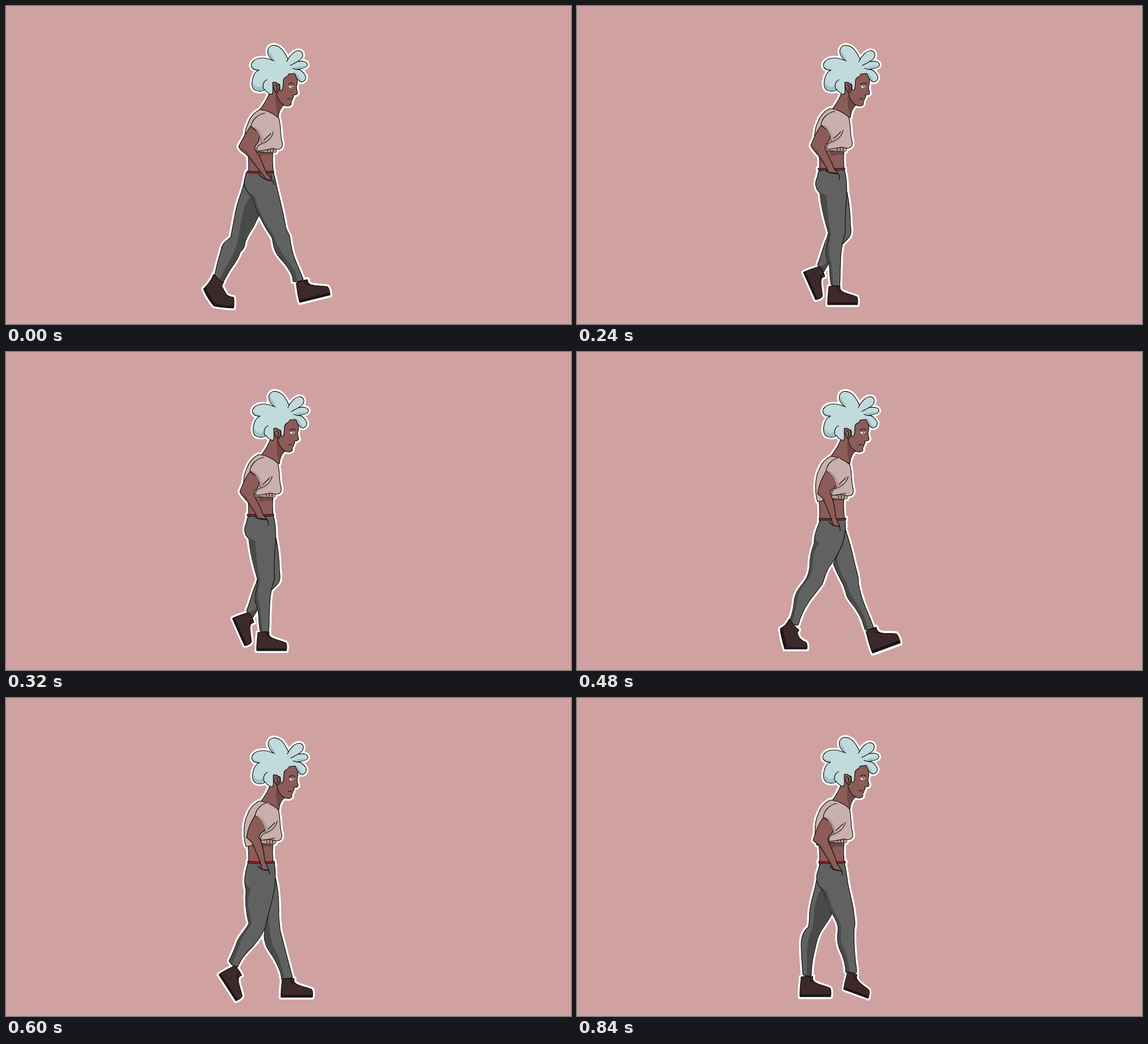
Write an HTML page without scripts that moves like this. It is 998 by 561 pixels and loops after 960 ms.

```html
<!DOCTYPE html>
<html lang="en">
<head>
<meta charset="utf-8">
<title>Walk cycle</title>
<style>
  html, body { margin: 0; width: 100%; height: 100%; overflow: hidden; background: #cfa1a0; }
  svg { display: block; width: 100vw; height: 100vh; }
  path { stroke: var(--ink, #0d0a0a); stroke-width: var(--w, 1.15px); stroke-linejoin: round; stroke-linecap: round; }
  .halo { --ink: #fff; --w: 8px; }
  .hair { fill: #c1dadb; }
  .skin { fill: #8b5c58; }
  .shirt { fill: #c9b0ac; }
  .pants { fill: #616161; }
  .boot { fill: #3d282a; }
  .line { fill: none; }
  .shade { stroke: none; }
  .hair.shade { fill: #9cc3c7; }
  .skin.shade { fill: #6f4846; }
  .shirt.shade { fill: #b39a97; }
  .pants.shade { fill: #494949; }
  .boot.shade { fill: #1d1517; }
  .belt { fill: #9b2b2d; }
  .pose { visibility: hidden; animation: show 960ms step-end calc(var(--i) * 120ms - 960ms) infinite; }
  @keyframes show {
    0% { visibility: visible; }
    12.5%, 100% { visibility: hidden; }
  }
</style>
</head>
<body>
<svg viewBox="0 0 998 561">
<defs>
  <g id="head">
    <path class="skin" d="M466 150C463 163 456 172 447 185L481 197C481 187 485 181 490 175C496 177 502 177 504 173C503 169 504 167 506 165C505 163 508 162 508 160L507 157C511 157 515 156 515 153C513 148 512 144 514 139C515 132 515 124 512 117L489 115Z"/>
    <path class="skin shade" d="M477 152C479 163 484 170 490 174C485 181 482 186 480 193C476 182 475 165 477 152Z"/>
    <path class="line" d="M478 156C480 165 485 171 491 175M497 164L503 163"/>
    <path class="hair" d="M474 97C466 93 460 84 463 76C466 68 475 68 482 72C489 76 494 85 498 94C503 86 508 80 515 79C523 78 526 85 523 91C520 95 517 97 515 98C520 97 523 97 527 98C533 100 534 105 529 108C525 110 520 111 513 112C520 111 525 116 529 123C531 130 526 134 521 134C516 132 512 125 510 119L499 120C499 126 491 124 490 131C489 140 490 146 487 149L484 148C484 142 484 139 483 138L472 135C470 141 473 150 470 156C464 155 460 152 457 147C454 151 447 151 441 149C434 146 433 137 436 127C438 119 442 115 447 113C437 114 431 108 434 101C438 93 447 91 458 92C464 93 468 95 474 97Z"/>
    <path class="hair shade" d="M435.500 132C434 144 440 149 449 149C454 149 456 145 455 138C450 146 440 145 435.500 132ZM511 118C514 129 518 133 523 133C519 129 517 121 511 118ZM507 110C516 111 526 111 531 106C524 107 516 105 507 110ZM474 97C466 92 462 83 464 76C467 86 473 88 474 97ZM435 104C435 111 441 113 448 111C441 110 437 109 435 104Z"/>
    <path class="line" d="M456 148C452 142 454 133 461 130M498 94L496 98M515 98L502 105M513 112L506 110"/>
    <path class="skin" d="M483 140C479 135 474 133 471 135C471 141 474 149 478 154C482 151 484 145 483 140Z"/>
    <path class="line" d="M475 139C480 140 480 145 478 150"/>
    <path class="shade" d="M499 141L508 141L505 145L501 144Z" fill="#efe6e4"/>
    <path class="line" d="M499 138C503 135 507 135 509 138M504.500 141.500L505 144"/>
  </g>

  <g id="belly">
    <path class="skin" d="M427 256C428 268 430 280 428 298L473 298C471 284 470 268 472 254Z"/>
    <path class="skin shade" d="M446 256L471 256L470 263Q459 260 449 265Z"/>
  </g>
  <path id="belt" class="belt" d="M426 -1Q450 1 473 -1V2Q450 4 426 2Z"/>

  <g id="shirt">
    <path class="shirt" d="M447 181C456 181 470 186 481 196C485 210 483 222 486 235C489 245 487 251 477 251L476 256C465 257 454 256 446 255L430 260L424 261C420 250 418 222 426 206C430 194 437 186 447 181Z"/>
    <path class="shirt shade" d="M446 251Q460 247 477 251L476 256Q461 257 447 254Z"/>
    <path class="line" d="M456 250Q466 247 477 251M461 251V255M466 250V255M471 250V255"/>
  </g>
  <g id="sleeve">
    <path class="shirt" d="M455 186C443 188 432 198 431 210C441 213 448 225 449 238L466 222"/>
    <path class="shirt shade" d="M432 210C441 208 450 220 454 235L449 238C448 226 441 214 432 210Z"/>
    <path class="shirt" d="M470 219C468 230 461 236 449 240C442 243 440 248 441 253Q453 252 466 249"/>
    <path class="shirt shade" d="M469 224C467 231 460 237 449 241L444 244Q463 241 469 224Z"/>
  </g>

  <!-- heel at the origin, toe to the right -->
  <g id="boot">
    <path class="boot" d="M2 -32C9 -34 16 -34 23 -33C22 -29 23 -26 26 -24C34 -19 45 -18 54 -14C56 -11 56 -5 55 0H0C-1 -10 1 -20 2 -32Z"/>
    <path class="boot shade" d="M0 -4H55V0H0Z"/>
    <path class="line" d="M17 -33L19 -26L26 -24"/>
  </g>

  <g id="p0">
    <use href="#belly"/>
    <path class="pants" d="M421 308C419 325 409 342 405 365C402 382 399 396 397 408C390 414 382 418 380 430C376 445 371 460 369 474C372 480 379 486 384 487C386 482 391 474 396 465C403 455 410 446 413 436C416 430 422 428 422 419C424 408 432 397 438 388C441 380 446 372 448 366L433 335Z"/>
    <path class="pants shade" d="M433 335L447 366C443 377 434 391 427 402C422 409 423 419 420 424C412 435 410 446 398 460L384 485L377 482C388 460 400 443 406 426C412 408 414 385 418 367C421 352 427 343 433 335Z"/>
    <path class="pants" d="M424 294H472C476 305 478 318 481 330C487 355 492 375 494 390C496 398 500 402 501 406C503 420 505 435 511 448C517 463 522 474 525 482C520 487 513 487 507 486C507 478 504 471 499 464C493 453 481 444 476 433C472 424 472 417 470 409C462 397 450 378 441 355C438 345 436 340 433 335C426 328 420 320 421 312C421 305 423 300 424 294Z"/>
    <path class="pants shade" d="M424 322Q430 331 440 337C444 362 461 386 474 407C479 428 497 447 510 467L515 486L508 485C505 466 487 449 477 433L471 409C455 386 443 363 438 345Q433 333 424 322Z"/>
    <path class="boot" d="M367 473C362 486 355 493 349 499C352 508 360 520 367 529C378 532 390 532 402 533C403 526 403 519 402 514C395 513 389 510 388 507L381 494L384 488C378 484 372 479 367 473Z"/>
    <path class="boot shade" d="M349 499C352 509 360 521 367 529C378 532 390 532 402 533V529C390 529 378 528 370 525C363 518 357 508 353 496Z"/>
    <use href="#boot" transform="translate(519 523)rotate(-14)scale(1 1.08)"/>
    <use href="#belt" y="292"/>
    <use href="#head"/>
    <use href="#shirt" x="1" y="2"/>
    <path class="skin" d="M432 212C424 224 416 237 411 248C414 256 421 259 425 262L452 296L461 307L470 306C466 301 462 298 460 294C455 283 450 270 446 262C441 256 438 252 441 246C447 241 449 234 447 224Z"/>
    <path class="skin shade" d="M412 249L425 256L458 301L451 294L425 261Z"/>
    <use href="#sleeve" x="2" y="3"/>
    <path class="line" d="M446 297Q456 307 472 309L473 315M467 296L469 303"/>
  </g>

  <g id="p1">
    <use href="#belly"/>
    <path class="pants" d="M422 318C418 340 418 362 422 380C424 392 426 396 424 402C417 408 406 417 402 424C400 440 392 455 386 464C389 470 394 474 399 475C405 464 416 454 428 444C440 435 450 424 452 414L455 406L431 334Z"/>
    <path class="pants shade" d="M431 334L455 406C450 424 438 436 425 446Q409 458 399 474L394 472C403 458 415 448 425 432C432 420 438 412 438 395C437 375 432 350 431 334Z"/>
    <path class="pants" d="M426 291L474 290C479 305 482 325 482 345C483 365 481 385 481 393C483 400 484 402 484 409C487 420 492 435 495 450C500 470 504 485 506 493C500 497 493 496 487 496C486 482 478 467 470 454C461 442 455 432 455 420C457 408 452 402 448 392C441 375 434 352 431 334C425 328 422 321 423 312Z"/>
    <path class="pants shade" d="M425 326Q433 334 440 336C443 360 444 378 458 400C463 412 461 425 470 440Q486 462 491 495L487 495C486 475 473 458 466 447C459 437 455 430 456 418C458 406 449 395 445 382C439 364 434 350 431 334Z"/>
    <use href="#boot" transform="translate(365 486)rotate(57)"/>
    <use href="#boot" x="486" y="528"/>
    <use href="#belt" x="1" y="289"/>
    <use href="#head" x="1" y="1"/>
    <use href="#shirt"/>
    <path class="skin" d="M431 211C423 224 416 236 411 248C415 255 420 258 424 262L444 291L450 302L465 305C462 300 458 296 455 292C452 283 448 270 444 262C438 255 438 249 441 244C448 240 449 232 446 222Z"/>
    <path class="skin shade" d="M412 249L424 256L451 298L444 290L424 261Z"/>
    <use href="#sleeve"/>
    <path class="line" d="M444 294Q452 303 470 306L472 311"/>
  </g>

  <g id="p2">
    <use href="#belly"/>
    <path class="pants" d="M470 305C478 325 482 350 483 385C485 400 484 406 478 411L469 420L446 452L434 472C430 468 427 462 425 456C432 440 434 425 442 408Z"/>
    <path class="pants shade" d="M446 452L434 471L429 462L442 452Z"/>
    <path class="pants" d="M427 291C440 287 458 288 472 289C476 300 477 320 476 340C473 365 474 385 474 400C472 408 469 416 468 425C465 440 466 455 465 465C465 475 465 485 464 493C460 496 454 495 449 492C446 480 447 465 445 455C440 442 438 435 441 424C443 415 446 410 444 400C438 380 431 355 429 330C421 322 420 312 424 303Z"/>
    <path class="pants shade" d="M424 323Q433 332 440 333C443 360 443 380 449 402C443 423 444 433 449 452L453 493L449 491C447 470 447 460 444 451C439 439 440 429 442 422C446 411 445 403 443 396C437 376 431 354 429 330Z"/>
    <use href="#boot" transform="translate(400 470)rotate(66)scale(.96)"/>
    <use href="#boot" transform="translate(443 527)scale(.95 1)"/>
    <use href="#belt" y="287"/>
    <use href="#head" x="2"/>
    <use href="#shirt" x="-1"/>
    <path class="skin" d="M431 211C422 222 418 234 413 246C416 254 421 257 425 262L440 284L444 293L461 295C457 290 455 288 453 285C451 277 446 268 442 260C438 254 437 249 440 244C447 239 449 232 445 221Z"/>
    <path class="skin shade" d="M414 247L425 256L446 291L440 283L425 261Z"/>
    <use href="#sleeve"/>
    <path class="line" d="M440 291Q447 296 461 296Q465 300 463 306"/>
  </g>

  <g id="p3">
    <use href="#belly"/>
    <path class="pants" d="M474 312C480 332 485 350 490 370C492 378 495 385 493 392C491 410 491 425 492 435C494 450 497 460 498 467C492 471 484 470 479 465C480 455 478 445 473 434C467 425 465 412 465 400C464 392 466 372 468 350Z"/>
    <path class="pants shade" d="M468 360C474 390 476 402 483 415Q490 440 493 469L480 466C481 448 474 437 471 429C465 415 464 395 468 360Z"/>
    <path class="pants" d="M428 289L474 288C477 300 474 315 472 330C469 350 466 372 463 398C463 405 458 411 455 415C448 428 441 440 437 452C431 465 429 478 426 490C418 493 410 490 405 486C410 470 414 455 414 440C417 425 422 412 432 398C428 380 424 358 424 338C420 330 419 315 424 303Z"/>
    <path class="pants shade" d="M422 322Q425 331 433 335Q426 344 428 360L434 398C424 414 420 428 419 442L412 489L406 486C414 455 412 428 432 398C427 375 424 358 425 338Z"/>
    <use href="#boot" transform="translate(469 500)rotate(27)skewX(4)scale(.92 1.08)"/>
    <use href="#boot" transform="translate(399 527)scale(.93 1.08)"/>
    <use href="#belt" x="1" y="287"/>
    <use href="#head" x="1"/>
    <use href="#shirt" x="1"/>
    <path class="skin" d="M436 209C428 220 424 234 420 246C424 252 428 257 430 264L446 290L449 300L462 300C460 295 458 291 456 287C455 275 452 268 449 259C444 250 444 246 448 240C455 237 456 228 452 220Z"/>
    <path class="skin shade" d="M421 247L430 257L451 297L446 289L430 263Z"/>
    <use href="#sleeve" x="5" y="-2"/>
    <path class="line" d="M441 294Q449 300 465 301L463 308"/>
  </g>

  <g id="p4">
    <use href="#belly"/>
    <path class="pants" d="M474 313C480 330 486 352 491 375C494 388 498 397 497 407C500 425 505 440 511 454C516 466 521 477 524 487C519 491 513 491 509 490C506 482 504 472 497 460C490 448 481 440 477 431C474 422 473 416 469 408C463 395 456 385 453 373C462 355 470 335 474 313Z"/>
    <path class="pants shade" d="M459 361C461 382 469 396 478 411C481 429 499 449 508 468L515 490L509 489C505 470 488 449 478 431L470 408C464 395 456 385 454 373Z"/>
    <path class="pants" d="M430 296L473 294C476 308 473 322 470 335C465 352 456 365 447 377C439 388 438 398 433 410C426 420 417 430 410 440C402 452 395 465 391 481C386 484 379 480 376 473C381 460 383 448 384 436C386 425 392 417 400 407C408 397 409 390 411 380C411 365 413 352 419 338C418 325 424 310 430 296Z"/>
    <path class="pants shade" d="M420 326Q423 336 429 338Q417 345 416 378C415 399 395 414 390 430Q388 452 380 478L377 473C384 450 382 435 389 422C398 406 411 400 411 380C411 365 413 352 420 338Z"/>
    <path class="boot" d="M375 471C371 480 365 485 359 488C360 500 364 514 367 524H406C407 518 406 514 404 512C396 509 392 505 389 496L392 490C385 486 380 478 375 471Z"/>
    <path class="boot shade" d="M359 488C360 500 364 514 367 524H406V521H371L363 486Z"/>
    <use href="#boot" transform="translate(522 531)rotate(-20)scale(.95 1.22)"/>
    <use href="#belt" x="2" y="294"/>
    <use href="#head" x="1"/>
    <use href="#shirt" x="1" y="3"/>
    <path id="arm" class="skin" d="M441 209C432 222 427 235 425 250C430 255 434 257 436 262L449 293L452 306L464 308C462 300 459 297 457 292C456 280 454 268 451 258C446 250 446 246 452 241C461 237 460 228 456 218Z"/>
    <path class="skin shade" d="M426 250L436 257L454 304L449 292L436 261Z"/>
    <use href="#sleeve" x="9"/>
    <path class="line" d="M445 300Q452 307 464 308L465 315"/>
  </g>

  <g id="p5">
    <use href="#belly"/>
    <path class="pants" d="M474 310C480 330 482 350 482 375C481 390 484 400 484 409C487 420 495 450 506 493C500 497 492 496 487 496C486 482 478 467 470 454C461 442 456 432 456 418L462 370Z"/>
    <path class="pants shade" d="M463 375C464 402 466 420 472 438Q487 463 491 495L487 495C485 475 475 460 468 450C459 437 456 430 457 418Z"/>
    <path class="pants" d="M428 290H474C477 308 476 322 474 338C470 360 463 382 460 396C458 410 448 424 438 436C426 448 416 458 409 475C402 474 397 470 394 464C400 452 405 440 409 428C414 418 424 408 429 398C424 380 422 362 424 338C420 328 421 310 428 290Z"/>
    <path class="pants shade" d="M422 324Q426 333 433 336Q426 347 428 370L434 398C426 412 415 421 413 436L399 470L395 464C404 447 406 425 421 411L429 398C423 375 423 358 425 338Z"/>
    <use href="#boot" transform="translate(376 488)rotate(57)"/>
    <use href="#boot" x="486" y="528"/>
    <use href="#belt" x="1" y="289"/>
    <use href="#head" x="1" y="1"/>
    <use href="#shirt" y="1"/>
    <use href="#arm" y="-4"/>
    <use href="#sleeve" x="9" y="-2"/>
    <path class="line" d="M445 297Q452 304 464 304L466 311"/>
  </g>

  <g id="p6">
    <use href="#belly"/>
    <path class="pants" d="M471 402C468 425 466 445 466 460C466 472 467 480 467 489C461 492 453 491 449 488C450 475 448 455 444 438L458 405Z"/>
    <path class="pants shade" d="M460 421Q452 440 455 460L456 490L450 488C450 468 448 452 446 440Z"/>
    <path class="pants" d="M429 289C445 286 460 287 473 288C475 300 474 330 473 350C471 375 473 390 471 402C466 412 458 421 450 434C440 448 432 462 426 476C421 478 413 471 411 463C419 450 427 435 428 420C430 410 436 402 440 394C437 375 427 355 426 334C420 322 421 305 429 289Z"/>
    <path class="pants shade" d="M424 323Q429 332 438 333Q430 338 433 352L445 394C440 403 434 411 433 424Q429 442 417 469L412 463C423 446 426 432 429 417L440 394C436 375 428 355 427 334Z"/>
    <use href="#boot" transform="translate(389 461)rotate(87)scale(.97 .9)"/>
    <use href="#boot" transform="translate(445 526)scale(.97 1.05)"/>
    <use href="#belt" x="1" y="287"/>
    <use href="#head" x="2" y="1"/>
    <use href="#shirt" y="-1"/>
    <path class="skin" d="M441 208C432 220 427 235 425 250C430 253 433 256 436 262L448 286L452 297L464 298C461 293 460 290 457 285C455 274 453 266 450 257C446 249 446 245 451 240C459 236 459 227 455 217Z"/>
    <path class="skin shade" d="M426 250L436 257L454 295L448 286L436 261Z"/>
    <use href="#sleeve" x="8" y="-3"/>
    <path class="line" d="M446 292Q453 298 465 298Q470 302 469 309"/>
  </g>

  <g id="p7">
    <use href="#belly"/>
    <path class="pants" d="M423 322C419 345 412 360 411 378C410 392 411 398 408 405C399 412 396 422 396 435C396 455 398 470 399 488C404 491 411 491 414 489C414 470 417 455 421 440C424 425 428 415 433 408C438 400 446 390 450 381L432 335Z"/>
    <path class="pants shade" d="M432 335L449 381C443 393 433 403 429 413C420 431 415 458 413 489L406 489C407 465 404 440 411 418C421 401 417 380 421 363Q425 345 432 335Z"/>
    <path class="pants" d="M430 291L472 290C475 300 477 318 479 330C483 350 488 365 489 380C491 392 492 400 490 405C488 420 490 440 491 455C492 468 494 475 494 484C488 487 480 487 475 484C474 470 472 460 466 448C461 438 460 430 460 420C462 408 462 400 456 390C448 375 440 358 436 341C426 332 421 322 424 310Z"/>
    <path class="pants shade" d="M425 325Q433 338 442 341C444 362 458 382 466 399C468 414 463 425 469 437Q480 460 481 485L476 484C475 466 470 456 466 446C460 434 461 424 461 418C463 405 461 398 456 390C446 374 440 358 436 341Z"/>
    <use href="#boot" transform="translate(471 514)rotate(20)skewX(10)scale(.84 .98)"/>
    <use href="#boot" transform="translate(394 527)scale(.98 1.08)"/>
    <use href="#belt" x="1" y="289"/>
    <use href="#head" x="1"/>
    <use href="#shirt" y="-1"/>
    <path class="skin" d="M435 211C426 223 421 237 417 251C422 256 426 258 429 262L448 292L453 303L468 305C465 300 461 296 459 291C456 281 451 270 448 261C442 253 442 248 446 242C453 238 454 230 450 220Z"/>
    <path class="skin shade" d="M418 251L429 257L455 300L448 291L429 261Z"/>
    <use href="#sleeve" x="4"/>
    <path class="line" d="M446 296Q454 305 468 305L469 312"/>
  </g>
</defs>

<rect width="998" height="561" fill="#cfa1a0"/>
<g class="pose" style="--i:0"><use href="#p0" class="halo"/><use href="#p0"/></g>
<g class="pose" style="--i:1"><use href="#p1" class="halo"/><use href="#p1"/></g>
<g class="pose" style="--i:2"><use href="#p2" class="halo"/><use href="#p2"/></g>
<g class="pose" style="--i:3"><use href="#p3" class="halo"/><use href="#p3"/></g>
<g class="pose" style="--i:4"><use href="#p4" class="halo"/><use href="#p4"/></g>
<g class="pose" style="--i:5"><use href="#p5" class="halo"/><use href="#p5"/></g>
<g class="pose" style="--i:6"><use href="#p6" class="halo"/><use href="#p6"/></g>
<g class="pose" style="--i:7"><use href="#p7" class="halo"/><use href="#p7"/></g>
</svg>
</body>
</html>
```
